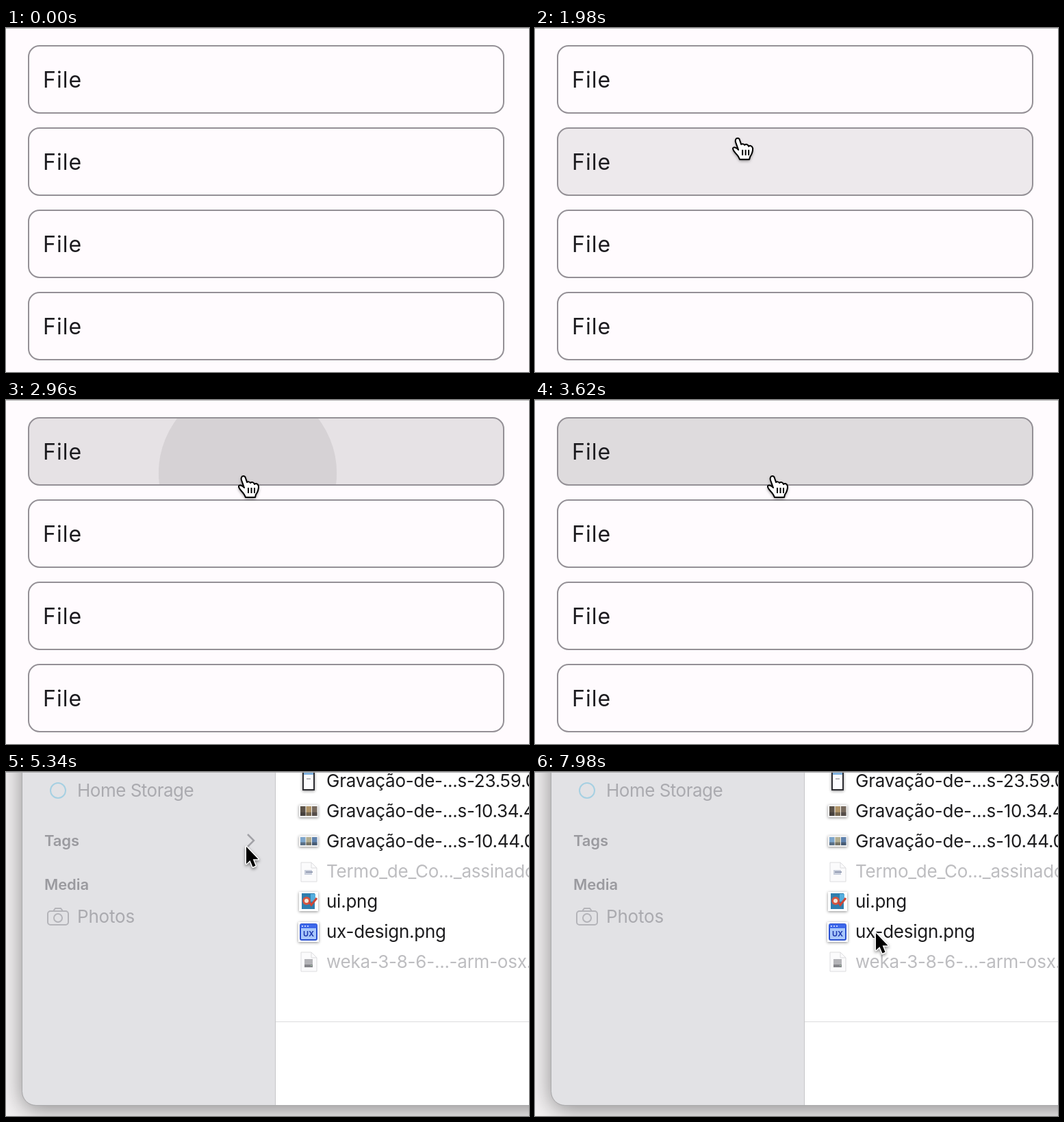
Write an HTML page with a canvas that moves like this. It is 764 by 502 pixels and loops after 8000 ms.

```html
<!DOCTYPE html>
<html lang="en">
<head>
<meta charset="utf-8">
<title>File picker</title>
<style>
html, body { margin: 0; width: 100%; height: 100%; overflow: hidden; background: #fffbfe; }
canvas { display: block; width: 764px; height: 502px; }
</style>
</head>
<body>
<canvas id="stage" width="764" height="502"></canvas>
<script>
const ctx = document.getElementById('stage').getContext('2d');
const W = 764, H = 502, LOOP = 8000;
const FONT = 'Inter, "Open Sans", sans-serif';

const PRESS = 2860, RELEASE = 2970, DIALOG = 4600;
const ROW = { x: 33, y: 26, w: 694, h: 98, step: 120, r: 16 };
// time, x, y of the pointer's hot spot
const PATH = [[1250, 213, 508], [1380, 250, 325], [1640, 250, 325], [1980, 299, 157],
              [2300, 350, 107], [5700, 350, 107], [6450, 497, 233]];
// enter and leave time of the pointer, row by row
const HOVER = [[2210, LOOP], [1805, 2070], [1354, 1765], [1268, 1338]];

const clamp = v => Math.max(0, Math.min(1, v));
const ramp = (t, start, length) => clamp((t - start) / length);
const smooth = v => v * v * (3 - 2 * v);
const mix = (a, b, k) => a + (b - a) * k;

function rounded(x, y, w, h, r) {
  ctx.beginPath();
  ctx.roundRect(x, y, w, h, r);
}

function box(x, y, w, h, color) {
  ctx.fillStyle = color;
  ctx.fillRect(x, y, w, h);
}

function disc(x, y, r, color) {
  ctx.fillStyle = color;
  ctx.beginPath();
  ctx.arc(x, y, r, 0, Math.PI * 2);
  ctx.fill();
}

function label(text, x, y, size, color, weight = 400, spacing = 0) {
  ctx.font = `${weight} ${size}px ${FONT}`;
  ctx.letterSpacing = spacing + 'px';
  ctx.fillStyle = color;
  ctx.fillText(text, x, y);
}

function pointerAt(t) {
  if (t < PATH[0][0]) return null;
  let i = 0;
  while (i < PATH.length - 2 && t >= PATH[i + 1][0]) i++;
  const [t0, x0, y0] = PATH[i], [t1, x1, y1] = PATH[i + 1];
  let k = ramp(t, t0, t1 - t0);
  if (t > DIALOG) k = smooth(k);
  return { x: mix(x0, x1, k), y: mix(y0, y1, k) };
}

function drawRow(i, t) {
  const y = ROW.y + i * ROW.step;
  const [enter, leave] = HOVER[i];
  const hover = ramp(t, enter, 50) * (1 - ramp(t, leave, 50));
  rounded(ROW.x, y, ROW.w, ROW.h, ROW.r);
  ctx.fillStyle = `rgba(28,27,31,${0.08 * hover})`;
  ctx.fill();
  if (i === 0 && t >= PRESS) drawRipple(t);
  rounded(ROW.x, y, ROW.w, ROW.h, ROW.r);
  ctx.strokeStyle = '#949096';
  ctx.lineWidth = 2;
  ctx.stroke();
  label('File', 54, y + 61, 32, '#1c1b1f', 400, 1);
}

// Grows slowly while held, quickly after release, and drifts to the row's centre
function drawRipple(t) {
  const held = (Math.min(t, RELEASE) - PRESS) / 1000;
  const grow = clamp(held + Math.max(0, t - RELEASE) / 225);
  const alpha = 0.08 * ramp(t, PRESS, 75) * (1 - ramp(t, RELEASE + 225, 150));
  ctx.save();
  ctx.clip();
  box(ROW.x, ROW.y, ROW.w, ROW.h, `rgba(28,27,31,${0.07 * ramp(t, PRESS, 200)})`);
  disc(mix(350, 380, grow), mix(110, 75, grow), 351 * mix(0.3, 1, grow), `rgba(28,27,31,${alpha})`);
  ctx.restore();
}

function thumb(x, y, w, h, fill) {
  ctx.save();
  ctx.shadowColor = 'rgba(0,0,0,.45)';
  ctx.shadowBlur = 4;
  ctx.shadowOffsetY = 1;
  box(x, y, w, h, fill);
  ctx.restore();
}

function page(y) {
  ctx.beginPath();
  ctx.moveTo(431, y);
  ctx.lineTo(446, y);
  ctx.lineTo(454, y + 8);
  ctx.lineTo(454, y + 28);
  ctx.lineTo(431, y + 28);
  ctx.closePath();
  ctx.fillStyle = '#fbfbfc';
  ctx.fill();
  ctx.strokeStyle = '#dcdcde';
  ctx.lineWidth = 1;
  ctx.moveTo(446, y);
  ctx.lineTo(446, y + 8);
  ctx.lineTo(454, y + 8);
  ctx.stroke();
}

function strip(y, h, colors) {
  thumb(428, y, 28, h, '#f4f4f4');
  colors.forEach((c, i) => {
    box(430 + i * 8.5, y + 2, 7.5, h - 4, c);
    box(430 + i * 8.5, y + h * 0.6, 7.5, h * 0.4 - 2, 'rgba(45,45,50,.45)');
  });
}

function drawIcons() {
  thumb(433, -2, 18, 29, '#2b2b30');
  box(435, 0, 14, 25, '#fdfdff');
  box(435, 0, 14, 4, '#7fb2e0');
  box(439, 9, 6, 2, '#b9bac0');

  strip(48, 18, ['#5a5148', '#b09468', '#776a5e']);
  strip(93, 16, ['#7da6cc', '#b3ae90', '#5f82ad']);

  page(132);
  box(436, 143, 11, 7, '#c9cfdc');
  box(438, 145, 10, 2, '#969eb4');

  thumb(428, 175, 28, 28, '#ffffff');
  box(432, 177, 19, 23, '#2f7eae');
  box(445, 178, 7, 11, '#56aede');
  disc(439, 188, 6, '#d5553f');
  disc(439, 188, 3, '#f0e6da');
  ctx.strokeStyle = '#cc4738';
  ctx.lineWidth = 3;
  ctx.beginPath();
  ctx.moveTo(443, 190);
  ctx.lineTo(446, 194);
  ctx.lineTo(454, 184);
  ctx.stroke();

  thumb(427, 219, 30, 29, '#ffffff');
  rounded(430, 222, 24, 23, 2);
  ctx.fillStyle = '#a9c8fb';
  ctx.fill();
  ctx.strokeStyle = '#2a50d0';
  ctx.lineWidth = 2;
  ctx.stroke();
  box(430, 222, 24, 6, '#3d68ea');
  for (let i = 0; i < 3; i++) disc(433 + i * 4, 225, 1, '#e8edff');
  label('UX', 434, 240, 11, '#203bb0', 700);

  page(263);
  box(436, 273, 12, 12, '#b4b4b8');
  box(436, 281, 12, 4, '#85858a');
  box(445, 282, 2, 1, '#a0cfa4');
}

function drawSidebar(chevron) {
  const faint = '#aaaaaf', heading = '#9a9a9f';
  ctx.strokeStyle = '#a6d0e2';
  ctx.lineWidth = 2;
  ctx.beginPath();
  ctx.arc(76, 27, 11, 0, Math.PI * 2);
  ctx.stroke();
  label('Home Storage', 104, 36, 26, faint, 400, -0.5);
  label('Tags', 56, 108, 22, heading, 600, -0.1);
  label('Media', 56, 172, 22, heading, 600, -0.1);

  ctx.strokeStyle = '#b4b4b9';
  ctx.lineWidth = 2;
  ctx.beginPath();
  ctx.roundRect(61, 203, 30, 20, 4);
  ctx.moveTo(82, 213);
  ctx.arc(76, 213, 6, 0, Math.PI * 2);
  ctx.moveTo(69, 203);
  ctx.lineTo(72, 199);
  ctx.lineTo(80, 199);
  ctx.lineTo(83, 203);
  ctx.stroke();
  label('Photos', 104, 220, 26, faint, 400, -0.2);

  if (chevron) {
    ctx.strokeStyle = '#a2a2a7';
    ctx.lineWidth = 2.5;
    ctx.beginPath();
    ctx.moveTo(353, 91);
    ctx.lineTo(362, 100);
    ctx.lineTo(353, 109);
    ctx.stroke();
  }
}

function drawFiles() {
  const dark = '#1c1c1e', faint = '#bdbdc0';
  const files = [
    ['Gravação-de-...s-23.59.00', dark], ['Gravação-de-...s-10.34.40', dark],
    ['Gravação-de-...s-10.44.00', dark], ['Termo_de_Co..._assinado', faint],
    ['ui.png', dark], ['ux-design.png', dark], ['weka-3-8-6-...-arm-osx.d', faint]
  ];
  files.forEach(([name, color], i) => label(name, 468, 22 + i * 44, 26, color, 400, -0.25));
  drawIcons();
}

function drawDialog(t, pointer) {
  ctx.save();
  ctx.globalAlpha = smooth(ramp(t, DIALOG, 200));
  box(0, 0, W, H, '#f3f1f2');

  ctx.save();
  ctx.shadowColor = 'rgba(0,0,0,.45)';
  ctx.shadowBlur = 34;
  ctx.shadowOffsetY = 6;
  rounded(24, -60, W + 60, 546, 20);
  ctx.fillStyle = '#e2e2e5';
  ctx.fill();
  ctx.restore();

  ctx.save();
  rounded(24, -60, W + 60, 546, 20);
  ctx.clip();
  box(393, 0, W - 393, H, '#ffffff');
  box(393, 0, 1, H, '#c6c6c9');
  box(394, 364, W - 394, 1, '#dcdcde');
  drawSidebar(pointer.x < 393 && pointer.y < 125);
  drawFiles();
  ctx.restore();

  rounded(23.5, -60, W + 60, 546.5, 20);
  ctx.strokeStyle = '#aaaaac';
  ctx.lineWidth = 1;
  ctx.stroke();
  ctx.restore();
}

const HAND = new Path2D('M0 0C-3 0-4 3-3 6L1 17C-2 13-8 12-7 16C-6 20-2 22 1 27L3 31H17' +
  'L18 27C21 23 22 19 22 15C21 11 18 10 16 12C15 9 12 8 10 10C9 8 6 8 5 9L3 3C2.5 1 1.5 0 0 0Z');
const KNUCKLES = new Path2D('M7 17V25M11.5 17V25M16 17V25');
const ARROW = new Path2D('M1 2V27L6.5 22L10.5 31.5L14.5 29.8L10.7 20.3H18.5Z');

function drawPointer(p, hand) {
  ctx.save();
  ctx.translate(p.x, p.y);
  ctx.lineJoin = 'round';
  ctx.shadowColor = 'rgba(0,0,0,.5)';
  ctx.shadowBlur = 4;
  ctx.shadowOffsetY = 2;
  if (hand) {
    ctx.translate(-3, 4);
    ctx.fillStyle = '#ffffff';
    ctx.fill(HAND);
    ctx.shadowColor = 'transparent';
    ctx.strokeStyle = '#000000';
    ctx.lineWidth = 2;
    ctx.stroke(HAND);
    ctx.stroke(KNUCKLES);
  } else {
    ctx.strokeStyle = '#ffffff';
    ctx.lineWidth = 3;
    ctx.stroke(ARROW);
    ctx.shadowColor = 'transparent';
    ctx.fillStyle = '#000000';
    ctx.fill(ARROW);
  }
  ctx.restore();
}

function draw(t) {
  const pointer = pointerAt(t);
  box(0, 0, W, H, '#fffbfe');
  for (let i = 0; i < 4; i++) drawRow(i, t);
  if (t >= DIALOG) drawDialog(t, pointer);
  box(0, 0, W, 1, t < DIALOG ? '#b9b7b9' : '#aaaaac');
  if (pointer) {
    const overRow = HOVER.some(([enter, leave]) => t >= enter && t < leave);
    drawPointer(pointer, overRow && t < DIALOG);
  }
}

const start = performance.now();
function tick() {
  draw((performance.now() - start) % LOOP);
  requestAnimationFrame(tick);
}
tick();
</script>
</body>
</html>
```
